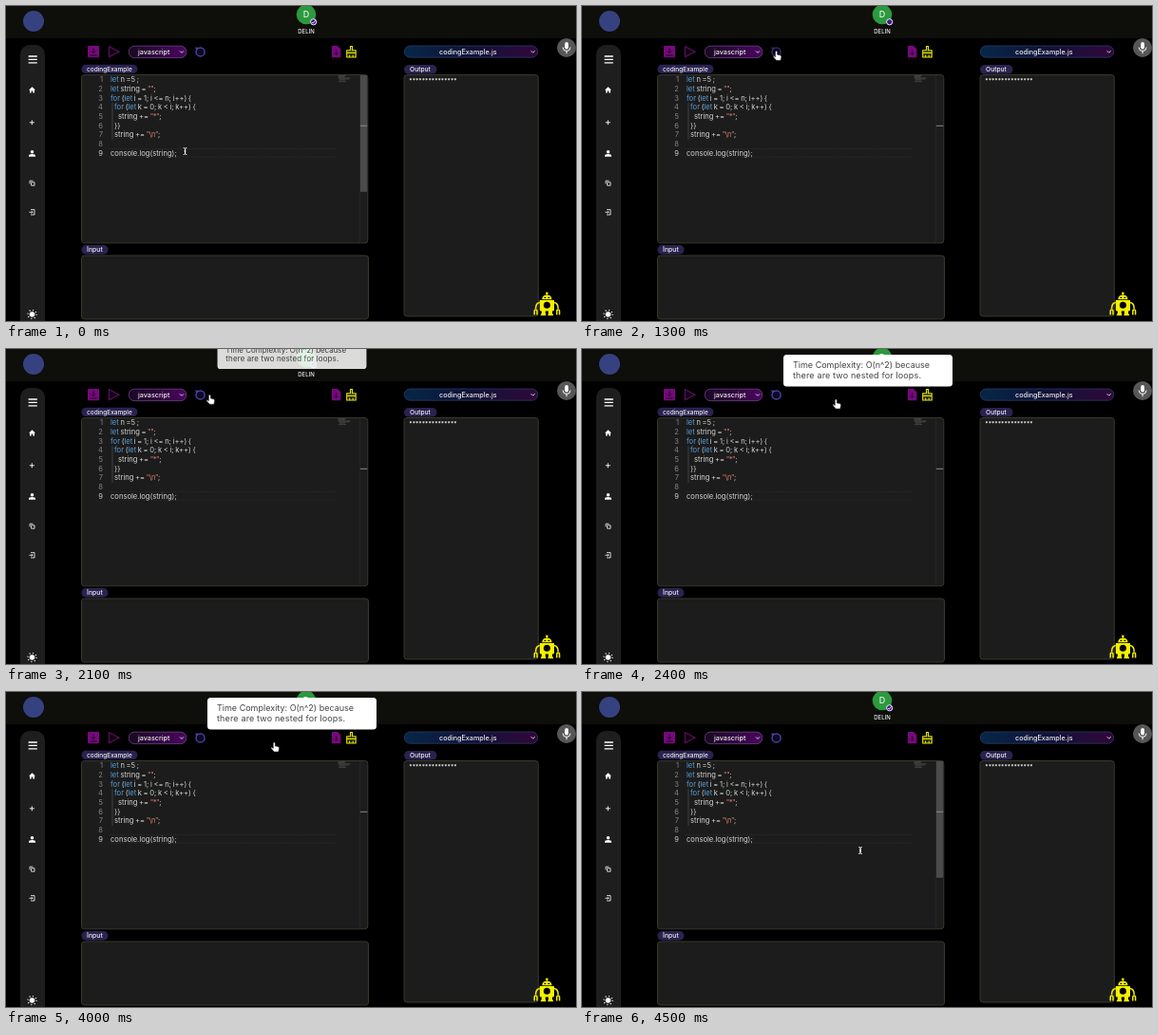
Recreate the animation shown at these times as an HTML page. Size 600 by 332 pixels, loop 4600 ms.

```html
<!DOCTYPE html>
<html lang="en">
<head>
<meta charset="utf-8">
<title>Code editor</title>
<style>
html, body { margin: 0; width: 100%; height: 100%; overflow: hidden; background: #000; }
svg { display: block; width: 100%; height: 100%; }
text { font: 500 7.2px Inter, "Open Sans", sans-serif; fill: #eee; white-space: pre; }
.code text { font-size: 7.6px; font-weight: 400; fill: #d4d4d4; word-spacing: -.5px; }
.code .num { fill: #858585; text-anchor: end; }
.code .active { fill: #c6c6c6; }
.kw { fill: #569cd6; }
.lit { fill: #c8d4c0; }
.str { fill: #ce7868; letter-spacing: -.5px; }
.panel { fill: #1c1c1c; stroke: #38382c; }
.tab { fill: #2a2350; }
.line { fill: none; stroke: #fff; }
.purple { fill: #78087e; }
.yellow { fill: #f4f000; }
#toast text { font-size: 9px; font-weight: 400; fill: #444; }
</style>
</head>
<body>
<svg viewBox="0 0 600 332" preserveAspectRatio="none">
  <defs>
    <linearGradient id="violet"><stop stop-color="#180822"/><stop offset="1" stop-color="#4a075e"/></linearGradient>
    <linearGradient id="night"><stop stop-color="#062747"/><stop offset=".5" stop-color="#111238"/><stop offset="1" stop-color="#30083a"/></linearGradient>
  </defs>

  <rect width="600" height="332"/>
  <rect width="600" height="34" fill="#0e0e0a"/>
  <circle cx="29" cy="16" r="11" fill="#35427f"/>

  <!-- profile -->
  <circle cx="316" cy="9" r="10.3" fill="#2b9a3e"/>
  <text x="316" y="12.3" text-anchor="middle" style="font-size:9px">D</text>
  <text x="316" y="28.6" text-anchor="middle" style="font-size:6px">DELIN</text>
  <circle cx="323.7" cy="16.8" r="3.1" fill="#46168c" stroke="#fff" stroke-width=".9"/>
  <path id="tick" class="line" d="M322.2 17l1.1 1.2 2.2-2.8" stroke-width=".9"/>

  <!-- sidebar -->
  <rect x="15" y="41" width="26" height="310" rx="10" fill="#1e1e1e"/>
  <path class="line" d="M23.6 53h9.2M23.6 56.4h9.2M23.6 59.8h9.2" stroke-width="1.3"/>
  <path d="M24.1 88.6l3.4-3.4 3.4 3.4h-.9v2.9h-1.7v-2h-1.6v2H25v-2.9z" fill="#fff"/>
  <path class="line" d="M24.8 122.8h5M27.3 120.3v5" stroke-width=".9"/>
  <circle cx="27.5" cy="153.8" r="1.8" fill="#fff"/>
  <path d="M24 158.7v-.8q0-1.9 3.5-1.9t3.5 1.9v.8z" fill="#fff"/>
  <path class="line" d="M26.6 185.8h3.4v3.4h-3.4zM25 187.4v-3.2h3.4" stroke-width=".8"/>
  <path class="line" d="M26 214.6h4v5.4h-4M24.4 217.3h3.6M26.8 216l1.3 1.3-1.3 1.3" stroke-width=".8"/>
  <circle cx="27.5" cy="325" r="2.8" fill="#fff"/>
  <circle class="line" cx="27.5" cy="325" r="4.5" stroke-width="1.3" stroke-dasharray="1 2.534"/>

  <!-- toolbar -->
  <rect class="purple" x="86" y="42" width="12" height="12.3" rx="1"/>
  <path class="line" d="M92 44.5v5M89.7 47.5l2.3 2.3 2.3-2.3M88.5 52h7" style="stroke:#1b0420"/>
  <path d="M108.5 42.8v10.7l10.5-5.3z" fill="#0c010e" stroke="#5e0d66" stroke-width="1.2"/>
  <rect x="129.3" y="42.2" width="60.5" height="12.4" rx="6" fill="url(#violet)" stroke="#704488" stroke-width=".8"/>
  <text x="139" y="50.9">javascript</text>
  <path class="line" d="M183 47.4l2 2 2-2" stroke-width=".8"/>
  <g id="refresh">
    <circle cx="204.6" cy="48.4" r="4.5" fill="#0c0924" stroke="#46429a" stroke-width="1.5"/>
    <path d="M199.2 43.6l3.8.2-2.6 3z" fill="#5a3cae"/>
  </g>
  <path class="purple" d="M343 42h6l3.3 3.3v9H343z"/>
  <path class="line" d="M347.6 46.5v4.6M345.6 49.3l2 2 2-2" style="stroke:#1b0420"/>
  <path d="M362.5 42.5h2v4.3h3.7v7.2h-9.5v-7.2h3.8zM358.7 49.4h9.5M361.7 51.4v2.6M365.2 51.4v2.6" fill="#262800" stroke="#e2e410" stroke-width="1.1"/>
  <rect x="419.3" y="42" width="140.3" height="12.2" rx="6" fill="url(#night)" stroke="#2a3a68" stroke-width=".8"/>
  <text x="456" y="50.6">codingExample.js</text>
  <path class="line" d="M552.7 47.2l2 2 2-2" stroke-width=".8"/>
  <circle cx="590" cy="44" r="10" fill="#575757"/>
  <rect x="588.2" y="38" width="3.8" height="7.4" rx="1.9" fill="#fff"/>
  <path class="line" d="M586.2 43.5q0 4 3.9 4t3.9-4M590.1 47.5v2.7"/>

  <!-- panels -->
  <rect class="panel" x="79.5" y="72.5" width="301.3" height="177.3" rx="3"/>
  <rect class="panel" x="79.5" y="263" width="302" height="67" rx="3"/>
  <rect class="panel" x="419" y="72.5" width="141.3" height="254.5" rx="3"/>
  <rect class="tab" x="79.5" y="61.8" width="59" height="9.2" rx="4.6"/>
  <text x="85" y="68.7" style="font-size:6.5px">codingExample</text>
  <rect class="tab" x="79.5" y="252" width="28" height="9.8" rx="4.9"/>
  <text x="85" y="259.3" style="font-size:6.9px">Input</text>
  <rect class="tab" x="419" y="62" width="34.5" height="9.6" rx="4.8"/>
  <text x="425" y="69.4" style="font-size:6.7px">Output</text>
  <text x="424.3" y="81.4" style="font-size:6px;font-weight:700">***************</text>

  <!-- editor -->
  <path class="line" d="M108 150.5h240M108 159.2h240" style="stroke:#2e2e2e" stroke-width=".8" stroke-dasharray="1 1"/>
  <path class="line" d="M112 102v39" style="stroke:#505050" stroke-width=".7"/>
  <g class="code" id="code"></g>
  <path class="line" d="M349.5 73.6h8M349.5 74.7h7M349.5 75.8h13M350.5 76.9h11M351 78h6M350 79.6h8" style="stroke:#666" stroke-width=".5"/>
  <path class="line" d="M372.7 73v176.5" style="stroke:#2c2c2c" stroke-width=".7"/>
  <rect id="scroll" x="373" y="73" width="7.2" height="122.8" fill="#4b4b4b"/>
  <path class="line" d="M373 126.3h7.3" style="stroke:#8a8a8a"/>
  <path id="caret" class="line" d="M180 150.8v8.2" stroke-width=".9"/>

  <!-- robot -->
  <g class="yellow">
    <circle cx="569.4" cy="302.8" r="1.3"/>
    <path d="M568.9 303h1v2h-1zM564.3 309.3q0-4.8 5.1-4.8t5.1 4.8zM561.8 310h15.2v10.2q0 1.2-1.2 1.2H563q-1.2 0-1.2-1.2zM563.8 321h4v2.5l.7 2.7h-6l1.3-2.7zM571 321h4v2.5l1.3 2.7h-6l.7-2.7z"/>
    <path d="M561.8 312.4q-4.2.4-4.2 6.6M577 312.4q4.2.4 4.2 6.6M556.2 325.6v-3.6q0-2 1.4-2t1.4 2v3.6M579.8 325.6v-3.6q0-2 1.4-2t1.4 2v3.6" fill="none" stroke="#f4f000" stroke-width="1.5"/>
    <path d="M566.6 306.7h1.7v1.3h-1.7zM570.5 306.7h1.7v1.3h-1.7z" fill="#000"/>
    <circle cx="569.4" cy="315.3" r="3.5" fill="#000"/>
  </g>

  <g id="toast">
    <rect x="212" y="6" width="178" height="33.6" rx="3.5" fill="#fff"/>
    <text x="222" y="20.3">Time Complexity: O(n^2) because</text>
    <text x="222" y="30.9" letter-spacing=".15">there are two nested for loops.</text>
  </g>

  <path id="beam" class="line" d="M-1.8 -3.5q1.8 0 1.8 1v5q0 1-1.8 1M1.8 -3.5q-1.8 0-1.8 1v5q0 1 1.8 1M-1 0h2" stroke-width=".9"/>
  <path id="hand" d="M-1.7 1.5v-5.3q0-1.1 1-1.1t1 1.1v2.7l3 .7q1.2.4 1.2 1.6l-.7 3.8h-4.5l-3-3.3q-.7-1 .3-1.4z" fill="#fff" stroke="#222" stroke-width=".5"/>
</svg>
<script>
const LOOP = 4600, STEP = 100;
const $ = id => document.getElementById(id);
const show = (id, on) => $(id).setAttribute('visibility', on ? 'visible' : 'hidden');

// Each source line: [indent, text]
const lines = [
  [0, 'let n =5 ;'],
  [0, 'let string = "";'],
  [0, 'for (let i = 1; i <= n; i++) {'],
  [1, 'for (let k = 0; k < i; k++) {'],
  [2, 'string += "*";'],
  [1, '}}'],
  [1, 'string += "\\n";'],
  [0, ''],
  [0, 'console.log(string);'],
];

const escapeHtml = s => s.replace(/&/g, '&amp;').replace(/</g, '&lt;');
const paint = s => s.split(/(".*?"|\b(?:let|for)\b|\b\d\b)/).map((part, i) => {
  if (i % 2 === 0) return escapeHtml(part);
  const kind = part[0] === '"' ? 'str' : /\d/.test(part) ? 'lit' : 'kw';
  return `<tspan class="${kind}">${part}</tspan>`;
}).join('');

$('code').innerHTML = lines.map(([indent, s], i) => {
  const y = 80.2 + i * 9.7;
  const active = i === 8 ? ' active' : '';
  return `<text class="num${active}" x="102" y="${y}">${i + 1}</text>
    <text x="${110 + indent * 4}" y="${y}">${paint(s)}</text>`;
}).join('');

// Pointer stops: [time, x, y]
const stops = [
  [0, 188.5, 153], [200, 188.5, 153], [600, 222, 75], [1000, 205.3, 52.3], [2000, 205.3, 52.3],
  [2400, 268, 58], [3600, 268, 58], [4000, 283, 58], [4500, 293, 167], [LOOP, 293, 167],
];
const clamp = v => Math.max(0, Math.min(1, v));
const ease = v => v * v * (3 - 2 * v);

function pointerAt(t) {
  const i = stops.findIndex(s => s[0] > t);
  const [t0, x0, y0] = stops[i - 1], [t1, x1, y1] = stops[i];
  const k = ease((t - t0) / (t1 - t0));
  return [x0 + (x1 - x0) * k, y0 + (y1 - y0) * k];
}

function draw(now) {
  const t = Math.floor(now % LOOP / STEP) * STEP;
  const [x, y] = pointerAt(t);
  const inEditor = x > 80 && x < 381 && y > 72 && y < 250;
  for (const id of ['beam', 'hand']) $(id).setAttribute('transform', `translate(${x} ${y})`);
  show('beam', inEditor);
  show('hand', !inEditor);
  show('scroll', inEditor);
  show('caret', t >= 500 && t < 1000);
  show('tick', t % 1400 < 1200);
  $('refresh').setAttribute('opacity', Math.hypot(x - 205, y - 49) < 7 ? .65 : 1);

  const leaving = clamp((t - 4000) / 200);
  const shown = 1 - (1 - clamp((t - 2000) / 300)) ** 3 - leaving;
  const scale = .6 + .4 * shown;
  show('toast', shown > 0);
  $('toast').setAttribute('opacity', leaving ? shown : .5 + shown / 2);
  $('toast').setAttribute('transform',
    `translate(301 ${23 - 56 * (1 - shown)}) scale(${scale}) translate(-301 -23)`);
  requestAnimationFrame(draw);
}
requestAnimationFrame(draw);
</script>
</body>
</html>
```
